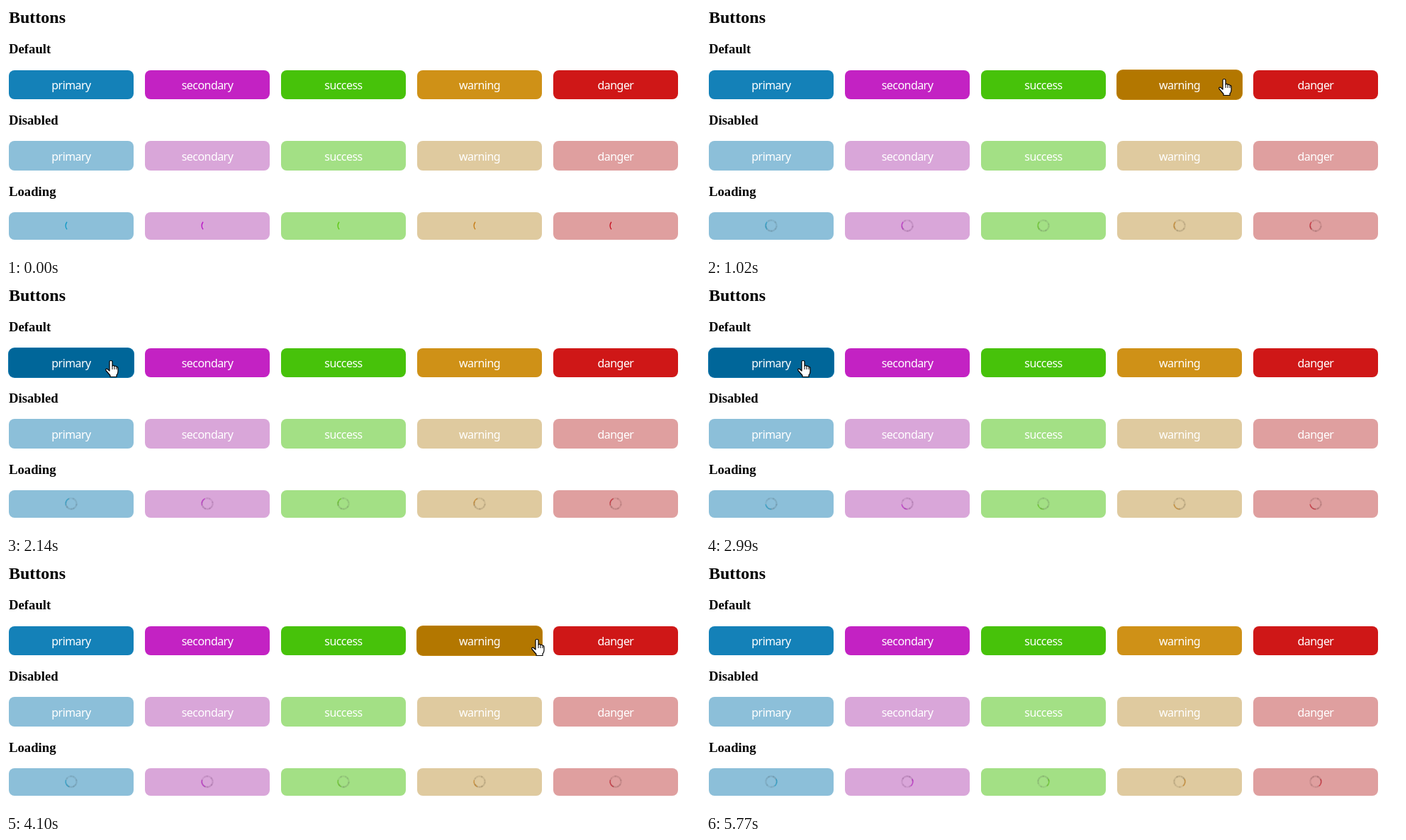
An HTML page that plays this animation: 979x354 px, repeating every 5840 ms.

```html
<!DOCTYPE html>
<html lang="en">
<head>
<meta charset="utf-8">
<title>Buttons</title>
<style>
  html, body { margin: 0; width: 100%; height: 100%; overflow: hidden; background: #fff; }
  svg { display: block; width: 979px; height: 354px; }
  .heading { font: bold 18.72px "Liberation Serif", "Times New Roman", serif; }
  .heading.title { font-size: 24px; }
  .label { font: 16px "Noto Sans", "Open Sans", sans-serif; letter-spacing: -0.55px; fill: #fff; text-anchor: middle; }
</style>
</head>
<body>
<svg id="stage" viewBox="0 0 979 354" xmlns="http://www.w3.org/2000/svg"></svg>
<script>
const LOOP = 5840;
const STEP = LOOP / 84;
const TURN = 15;        // steps per spinner revolution
const SEGMENTS = 14;
const WIDTH = 176;
const THEMES = [
  { name: 'primary', hue: 200, sat: 80, light: 40 },
  { name: 'secondary', hue: 300, sat: 70, light: 45 },
  { name: 'success', hue: 100, sat: 90, light: 40 },
  { name: 'warning', hue: 40, sat: 80, light: 45 },
  { name: 'danger', hue: 0, sat: 80, light: 45 }
];
// Pointer hot spot: step, x, y
const PATH = [
  [5, 978, 119], [15, 731, 103], [24, 356, 101], [33, 110, 109],
  [43, 137, 108], [46, 152, 108], [59, 749, 109], [67, 943, 107]
];

const stage = document.getElementById('stage');
const hsl = (hue, sat, light) => `hsl(${hue}, ${sat}%, ${light}%)`;

function set(node, attrs) {
  for (const key in attrs) node.setAttribute(key, attrs[key]);
}

function add(parent, tag, attrs, text = '') {
  const node = document.createElementNS('http://www.w3.org/2000/svg', tag);
  set(node, attrs);
  node.textContent = text;
  parent.append(node);
  return node;
}

const button = (x, y, height, fill) =>
  add(stage, 'rect', { x, y, width: WIDTH, height, rx: 8, fill });

function arcPath(radius, from, to) {
  const point = a => `${radius * Math.cos(a)} ${radius * Math.sin(a)}`;
  return `M${point(from)}A${radius} ${radius} 0 0 1 ${point(to)}`;
}

function spinner(x, { hue }) {
  const group = add(stage, 'g', { transform: `translate(${x} 311)`, fill: 'none' });
  const slice = 2 * Math.PI / SEGMENTS;
  const trail = Array.from({ length: SEGMENTS }, (_, k) => add(group, 'path', {
    d: arcPath(7.6, Math.PI + k * slice, Math.PI + (k + 0.9) * slice),
    stroke: hsl(hue, 20, 50), 'stroke-width': 2.2
  }));
  const arc = add(group, 'path', {
    d: arcPath(7.9, Math.PI - 0.72, Math.PI + 0.72),
    stroke: hsl(hue - 5, 85, 42), 'stroke-width': 1.3
  });
  return { trail, arc };
}

add(stage, 'text', { x: 4, y: 24, class: 'heading title' }, 'Buttons');
['Default', 'Disabled', 'Loading'].forEach((text, i) =>
  add(stage, 'text', { x: 4, y: 67 + 101 * i, class: 'heading' }, text));

const buttons = THEMES.map((theme, i) => {
  const { name, hue, sat, light } = theme;
  const left = 4 + 192 * i, middle = left + WIDTH / 2;
  const base = hsl(hue, sat, light);
  const dark = hsl(hue, 100, light - 10);
  const pale = hsl(hue, sat - 30, light + 30);
  const glow = add(stage, 'rect', {
    x: left - 1, y: 90, width: WIDTH + 2, height: 43, rx: 9, fill: hsl(hue, 90, light - 5)
  });
  const face = button(left, 91, 41, base);
  button(left, 191, 42, pale);
  button(left, 292, 39, pale);
  for (const y of [118, 219]) add(stage, 'text', { x: middle, y, class: 'label' }, name);
  return { left, base, dark, glow, face, spin: spinner(middle, theme) };
});

const outline = { fill: '#fff', stroke: '#000', 'stroke-width': 1.2, 'stroke-linejoin': 'round' };
const hand = add(stage, 'g', {});
add(hand, 'path', { ...outline,
  d: 'M-2 2Q-2 .5 0 .5T2 2V8Q4 6.5 5 8.5Q7 7.5 8 9.5Q10 9 10 11.5V16Q10 19 8 21V23.5H-1V21.5L-7 14.5Q-8 12 -5.5 12L-2 15Z' });
add(hand, 'path', { d: 'M2 8V13M5 9V13M8 10V13', fill: 'none', stroke: '#000' });
const arrow = add(stage, 'path', { ...outline, d: 'M0 0V16L3.7 12.6L6.2 18.5L8.6 17.5L6.1 11.7H11.2Z' });

// Each stretch slows down slightly towards its end.
function pointerAt(step) {
  const next = PATH.findIndex(key => key[0] > step);
  if (next < 1) return null;
  const [s0, x0, y0] = PATH[next - 1], [s1, x1, y1] = PATH[next];
  const eased = 1 - ((s1 - step) / (s1 - s0)) ** 1.25;
  return { x: x0 + (x1 - x0) * eased, y: y0 + (y1 - y0) * eased };
}

const isOver = (point, left) => point && point.x >= left && point.x <= left + WIDTH;
const show = (node, visible) => set(node, { visibility: visible ? 'visible' : 'hidden' });

function place(node, point, visible) {
  show(node, visible);
  if (visible) set(node, { transform: `translate(${Math.round(point.x)} ${Math.round(point.y)})` });
}

function drawSpinner({ trail, arc }, step, index) {
  const turns = step / TURN;
  set(arc, { transform: `rotate(${turns * 360})`, opacity: step ? 0.65 : 1 });
  trail.forEach((part, k) => {
    const passed = turns - (k + 0.5) / SEGMENTS;
    const age = passed - Math.floor(passed);
    const grain = 0.13 * Math.sin(k * 2.4 + index * 1.7 + Math.floor(turns) * 2);
    set(part, { opacity: passed < 0 ? 0 : 0.55 - 0.3 * age + grain });
  });
}

function draw(time) {
  const step = Math.floor((time % LOOP) / STEP + 0.35) % 84;
  const point = pointerAt(step);
  const felt = point && pointerAt(step - 1);   // hover reacts one step late
  buttons.forEach(({ left, base, dark, glow, face, spin }, i) => {
    const hovered = isOver(felt, left);
    show(glow, hovered);
    set(face, { fill: hovered ? dark : base });
    drawSpinner(spin, step, i);
  });
  const pointing = buttons.some(({ left }) => isOver(point, left));
  place(hand, point, point && pointing);
  place(arrow, point, point && !pointing);
}

const begin = performance.now();
function tick() {
  draw(performance.now() - begin);
  requestAnimationFrame(tick);
}
tick();
</script>
</body>
</html>
```
